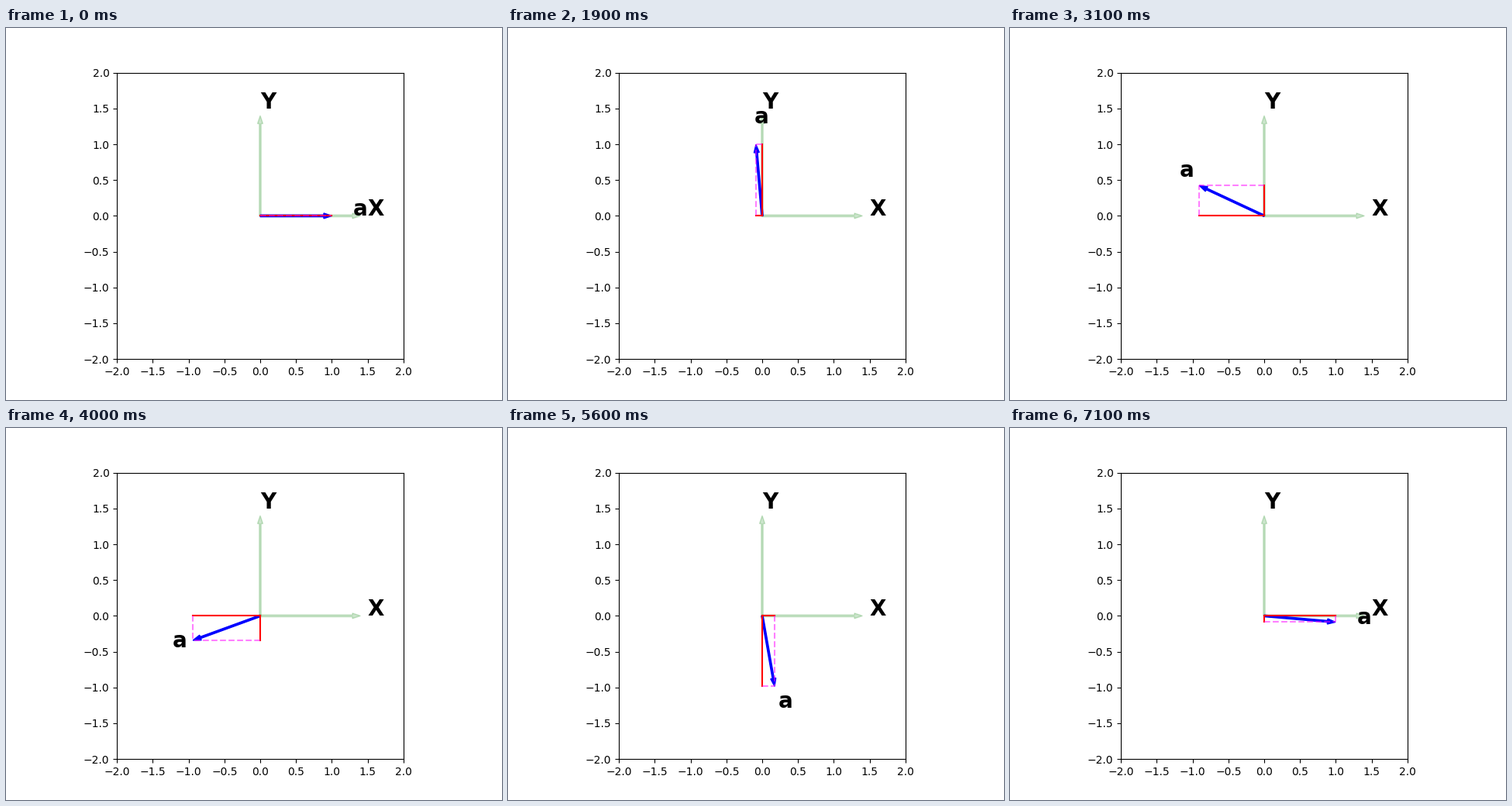
These frames come from a looping animation (640 px wide and 480 px high, 7200 ms). A matplotlib script:

```python
import numpy as np
import matplotlib.pyplot as plt
from matplotlib.animation import FuncAnimation
from matplotlib.patches import FancyArrow

FRAMES = 72
INTERVAL = 100
LABEL_REACH = 1.3

plt.rcParams["font.family"] = "DejaVu Sans"
fig, ax = plt.subplots(figsize=(6.4, 4.8), dpi=100)
ax.set_aspect("equal")
ax.set_xlim(-2, 2)
ax.set_ylim(-2, 2)
ticks = np.arange(-2, 2.1, 0.5)
ax.set_xticks(ticks)
ax.set_yticks(ticks)


def add_arrow(dx, dy, **style):
    arrow = FancyArrow(0, 0, dx, dy, width=0.025,
                       length_includes_head=True, **style)
    return ax.add_patch(arrow)


def add_label(x, y, text):
    return ax.text(x, y, text, fontsize=20, fontweight="bold")


def add_line(**style):
    return ax.plot([], [], lw=1.5, **style)[0]


add_arrow(1.4, 0, color="g", alpha=0.2)
add_arrow(0, 1.4, color="g", alpha=0.2)
add_label(1.5, 0, "X")
add_label(0, 1.5, "Y")

vector = add_arrow(1, 0, color="blue")
name = add_label(LABEL_REACH, 0, "a")
x_part = add_line(color="red")
y_part = add_line(color="red")
guide = dict(color="magenta", ls="--", alpha=0.5)
x_guide = add_line(**guide)
y_guide = add_line(**guide)


def update(i):
    angle = 2 * np.pi * i / FRAMES
    x, y = np.cos(angle), np.sin(angle)
    vector.set_data(dx=x, dy=y)
    name.set_position((LABEL_REACH * x, LABEL_REACH * y))
    x_part.set_data([0, x], [0, 0])
    y_part.set_data([0, 0], [0, y])
    x_guide.set_data([x, x], [0, y])
    y_guide.set_data([0, x], [y, y])
    return vector, name, x_part, y_part, x_guide, y_guide


anim = FuncAnimation(fig, update, frames=FRAMES, interval=INTERVAL,
                     repeat=True, repeat_delay=0)
plt.show()
```
